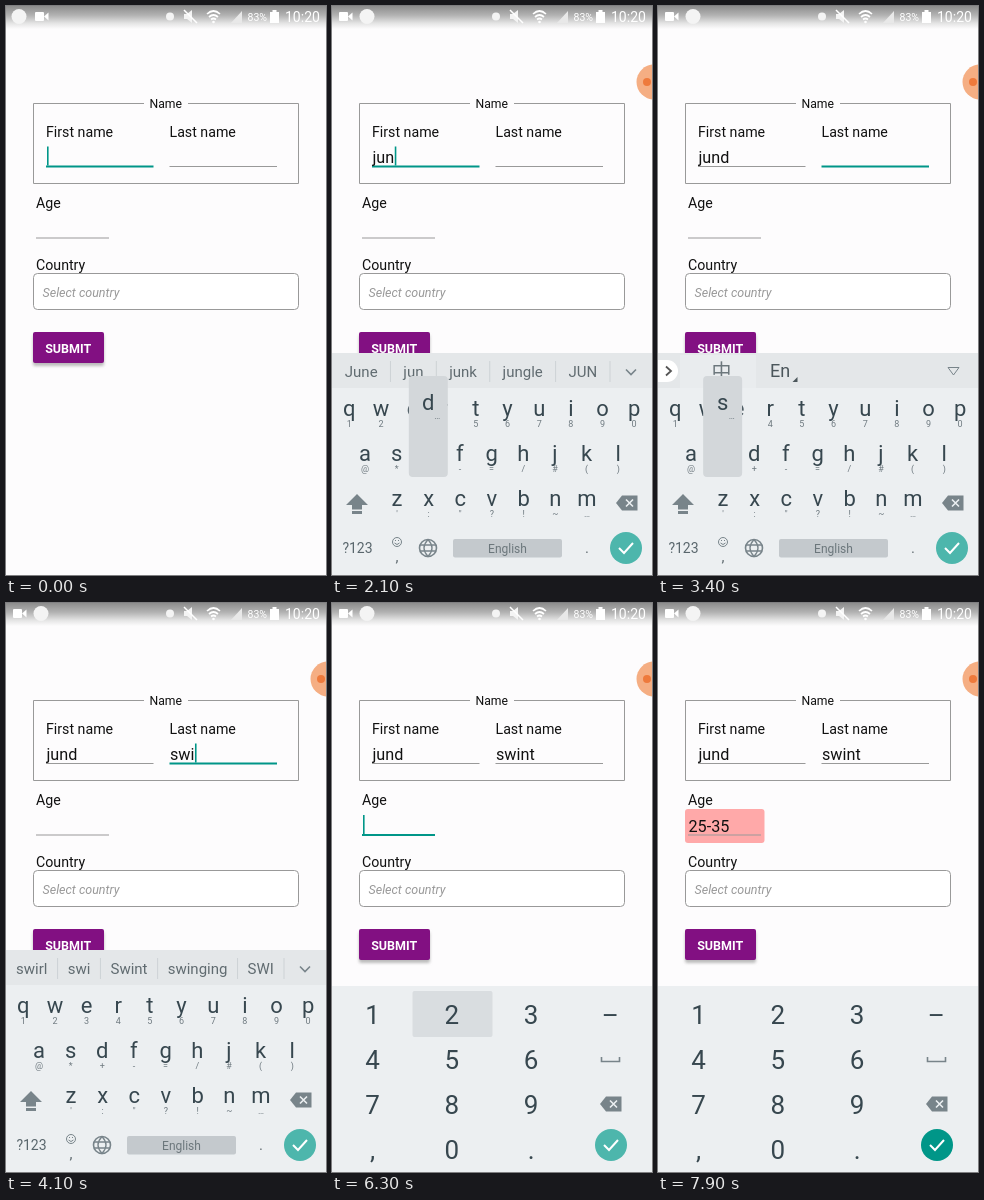
Recreate the animation shown at these times as an HTML page. Size 320x569 px, loop 8 s.

```html
<!DOCTYPE html>
<html lang="en">
<head>
<meta charset="utf-8">
<title>Form</title>
<style>
html, body { margin: 0; width: 100%; height: 100%; overflow: hidden; background: #fdfcfd; }
svg { display: block; width: 320px; height: 569px; font-family: Roboto, sans-serif; }
.mid { text-anchor: middle; }
.key { font-size: 22px; fill: #37474f; }
.num { font-size: 26px; fill: #37474f; }
.hint { font-size: 9px; fill: #6f7a80; }
.word { font-size: 15px; fill: #606b70; }
</style>
</head>
<body>
<svg id="stage" viewBox="0 0 320 569">
  <defs>
    <linearGradient id="bar" x2="0" y2="1">
      <stop offset="0" stop-color="#8c8c8c"/>
      <stop offset=".4" stop-color="#b2b2b2"/>
      <stop offset=".75" stop-color="#e4e4e4"/>
      <stop offset="1" stop-color="#fdfcfd"/>
    </linearGradient>
    <filter id="soft" x="-20%" y="-20%" width="140%" height="160%"><feGaussianBlur stdDeviation="1.6"/></filter>
  </defs>
</svg>
<script>
const LOOP = 8000, TEAL = '#009688', PALE = '#4db6ac', INK = '#37474f', GREY = '#78848a';
const stage = document.getElementById('stage');

function add(parent, tag, attrs, text) {
  const el = document.createElementNS('http://www.w3.org/2000/svg', tag);
  for (const k in attrs) el.setAttribute(k, attrs[k]);
  if (text !== undefined) el.textContent = text;
  parent.appendChild(el);
  return el;
}
const group = (p = stage) => add(p, 'g', {});
const rect = (p, x, y, width, height, fill, rx = 0) => add(p, 'rect', { x, y, width, height, fill, rx });
const dot = (p, cx, cy, r, fill) => add(p, 'circle', { cx, cy, r, fill });
const line = (p, d, stroke, width = 1) => add(p, 'path', { d, stroke, 'stroke-width': width, fill: 'none' });
const shape = (p, d, fill) => add(p, 'path', { d, fill });
const text = (p, x, y, str, size, fill = '#111', more = {}) => add(p, 'text', { x, y, 'font-size': size, fill, ...more }, str);
const label = (p, x, y, str, cls) => add(p, 'text', { x, y, class: 'mid ' + cls }, str);
const show = (el, on) => el.setAttribute('visibility', on ? 'visible' : 'hidden');

// Form
rect(stage, 0, 0, 320, 569, '#fdfcfd');
line(stage, 'M138 97.5H27.5V177.5H292.5V97.5H182', '#999');
text(stage, 143.5, 102, 'Name', 12.2);
text(stage, 40, 131, 'First name', 14.2);
text(stage, 163.5, 131, 'Last name', 14.2);
text(stage, 30, 202, 'Age', 14.2);
text(stage, 30, 263.5, 'Country', 14.2);
add(stage, 'rect', { x: 27.5, y: 267.5, width: 265, height: 36, rx: 4, fill: '#fff', stroke: '#999' });
text(stage, 36.5, 291, 'Select country', 12.5, '#999', { 'font-style': 'italic' });
rect(stage, 27, 329, 71, 31, '#bbb', 2).setAttribute('filter', 'url(#soft)');
rect(stage, 27, 326, 71, 31, '#821082', 2);
text(stage, 62.2, 346.5, 'SUBMIT', 12.5, '#fff', { class: 'mid', 'font-weight': 700 });
const error = rect(stage, 27, 206, 79.5, 34, '#ffa9a9', 3);

function makeField(x, width, base) {
  return {
    under: rect(stage, x, base + 2, width, 1, '#999'),
    value: text(stage, x + .5, base - 1.5, '', 16.2),
    caret: rect(stage, x + 1, base - 18, 1.6, 19, TEAL),
    x, base
  };
}
const fields = [makeField(40, 107.5, 158.5), makeField(163.5, 107.5, 158.5), makeField(30, 73, 230)];

// Status bar
rect(stage, 0, 0, 320, 23, 'url(#bar)');
const camera = group(), app = group();
rect(camera, -6, -4.5, 9, 9, '#fff', 1);
shape(camera, 'M3 0L7.5-4V4Z', '#fff');
dot(app, 0, 0, 7.5, '#f4f4f4');
dot(stage, 164, 10.5, 4, '#f4f4f4');
shape(stage, 'M178 8h3l5-4v13l-5-4h-3z', '#f4f4f4');
line(stage, 'M178 4l13 13', '#fff', 1.5);
line(stage, 'M201 8q6.500-6 13 0M203 11q4.500-4 9 0M205 13.500q2.500-2 5 0', '#fff', 1.7);
dot(stage, 207.500, 16, 1.3, '#fff');
shape(stage, 'M225 17h11V5z', '#e8e8e8');
text(stage, 241.5, 15, '83%', 10.5, '#fff');
shape(stage, 'M264 6h2.500V4h4v2h2.500v11h-9z', '#fff');
text(stage, 279, 15.5, '10:20', 14, '#fff');

// Floating bubble
const bubble = group();
dot(bubble, 322, 76, 17.5, '#f5ae83');
dot(bubble, 315, 76, 4, '#ee7a3c');

// Keyboards
function backspace(p, x, y) {
  shape(p, `M${x - 11} ${y}l6-7.500h15.500v15h-15.500z`, GREY);
  line(p, `M${x - 1} ${y - 3.5}l7 7m0-7l-7 7`, '#eceff1', 1.6);
}
function enter(p, x) {
  const disc = dot(p, x, 542, 16, PALE);
  line(p, `M${x - 7} 542l5 5 9-10`, '#fff', 2);
  return disc;
}

const abc = group();
rect(abc, 0, 347, 320, 222, '#eceff1');
rect(abc, 0, 347, 320, 35, '#e4e7e9');
const tools = group(abc), strip = group(abc);
rect(tools, 22, 349, 76, 33, '#e9ecee');
shape(tools, 'M0 354h9a11 11 0 0 1 0 22H0z', '#fff');
line(tools, 'M8 360.500l5 4.500-5 4.500', '#555', 1.8);
text(tools, 63.5, 372.5, '中', 20, '#6c777c', { class: 'mid', 'font-family': 'Noto Sans CJK SC, Noto Sans CJK, sans-serif' });
text(tools, 112, 371, 'En', 18, '#4b565b');
shape(tools, 'M134.500 376h5v-5z', '#4b565b');
line(tools, 'M290 361.500h11l-5.500 7.500z', GREY);

const keys = {};
const rows = [
  ['qwertyuiop', '1234567890', 17.3, 410, 421],
  ['asdfghjkl', '@*+-=/#()', 33, 455, 466],
  ['zxcvbnm', '\':"?!~…', 65, 500, 511]
];
for (const [letters, hints, x0, y, hy] of rows) {
  [...letters].forEach((ch, i) => {
    const x = x0 + 31.65 * i;
    label(abc, x, y, ch, 'key');
    label(abc, x, hy, hints[i], 'hint');
    keys[ch] = { x, y };
  });
}
shape(abc, 'M25 488l11 11h-6v4.500h-10V499h-6zM20 505h10v3h-10z', GREY);
backspace(abc, 295, 497);
text(abc, 25.5, 547, '?123', 14, '#59666c', { class: 'mid' });
add(abc, 'circle', { cx: 65, cy: 536, r: 4.5, fill: 'none', stroke: GREY });
line(abc, 'M62.500 537q2.500 3 5 0M63 534.500h1m2 0h1', GREY);
label(abc, 65, 556, ',', 'word');
add(abc, 'circle', { cx: 96, cy: 542, r: 8.5, fill: 'none', stroke: GREY, 'stroke-width': 1.6 });
line(abc, 'M88 539h16M88 545h16M96 533.500q-8 8.500 0 17q8-8.500 0-17', GREY, 1.3);
rect(abc, 121, 533, 109, 18.5, '#c4c9cd', 2);
text(abc, 175.5, 546.5, 'English', 12, '#6c777c', { class: 'mid' });
label(abc, 255, 547, '.', 'word');
const abcEnter = enter(abc, 294);
const popup = group(abc);
rect(popup, -19.5, -85, 39, 101, '#d3d7da', 4);
const popKey = label(popup, 0, -51, '', 'key');
label(popup, 9, -42, '…', 'hint');

const pad = group();
rect(pad, 0, 383, 320, 186, '#eceff1');
const cell = rect(pad, 0, 0, 80, 46, '#d9dde0', 2);
['123–', '456', '789', ',0.'].forEach((row, r) => [...row].forEach((ch, c) => {
  const x = 40.5 + 79.3 * c, y = 421 + 45 * r;
  label(pad, x, y, ch, 'num');
  keys[ch] = { x, y, pad: true };
}));
keys['-'] = keys['–'];
line(pad, 'M269.500 454v4.500h18V454', GREY, 1.6);
backspace(pad, 279, 501);
const padEnter = enter(pad, 279);

// Timeline: [field, key, down, up]
const taps = [
  [0, 'j', 1300, 1400], [0, 'u', 1600, 1700], [0, 'n', 1800, 1900], [0, 'd', 2100, 2200],
  [1, 's', 3400, 3500], [1, 'w', 3600, 3700], [1, 'i', 3900, 4000], [1, 'n', 4200, 4300], [1, 't', 4500, 4600],
  [2, '2', 6300, 6400], [2, '5', 6500, 6600], [2, '-', 6800, 6900], [2, '3', 7000, 7100], [2, '5', 7200, 7300]
];
const focuses = [[-200, 0], [2700, 1], [5300, 2], [7800, -1]];
const enters = [[2400, 2700], [5200, 5600], [7700, 8000]];
const slides = [[abc, 300, 2500], [abc, 2900, 5500], [pad, 5700, 9000]];
const ERROR_AT = 7800, BUBBLE_AT = 100;
const guesses = {
  j: 'just j join July J', ju: 'just ju jump July JU', jun: 'June jun junk jungle JUN', jund: 'Jund jund Jund\'s jungle',
  s: 'so s see some S', sw: 'sweet sw swim sweets SW', swi: 'swirl swi Swint swinging SWI',
  swin: 'swing swin Swint swings SWIN', swint: 'Swint swint Swint\'s smooth'
};

let stripWord = null;
function setStrip(word) {
  if (word === stripWord) return;
  stripWord = word;
  strip.replaceChildren();
  show(tools, !guesses[word]);
  if (!guesses[word]) return;
  const items = guesses[word].split(' ').map(w => label(strip, 0, 371, w, 'word'));
  const widths = items.map(el => el.getComputedTextLength());
  const gap = (278 - widths.reduce((a, b) => a + b, 0)) / items.length;
  let x = 0;
  items.forEach((el, i) => {
    const w = widths[i] + gap;
    el.setAttribute('x', x + w / 2);
    x += w;
    line(strip, `M${x} 355v21`, '#cdd2d5');
  });
  line(strip, 'M294 363.500l5 5 5-5', GREY, 1.6);
}

const clamp = v => Math.max(0, Math.min(1, v));

function moveBoards(t) {
  for (const board of [abc, pad]) {
    const run = slides.find(([b, from, to]) => b === board && t >= from && t < to + 200);
    show(board, run);
    board.style.display = run ? '' : 'none';
    if (!run) continue;
    const enterEase = 1 - (1 - clamp((t - run[1] + 50) / 250)) ** 3;
    const leaveEase = clamp((t - run[2] + 50) / 200) ** 2;
    const shown = enterEase * (1 - leaveEase);
    board.setAttribute('transform', `translate(0 ${(1 - shown) * 45})`);
    board.setAttribute('opacity', shown);
  }
}

function draw(t) {
  const [since, focus] = focuses.filter(f => f[0] <= t).pop();
  const typed = taps.filter(k => k[3] <= t);
  const word = i => typed.filter(k => k[0] === i).map(k => k[1]).join('');
  moveBoards(t);

  fields.forEach((f, i) => {
    const on = i === focus, str = word(i);
    if (f.value.textContent !== str) f.value.textContent = str;
    f.under.setAttribute('fill', on ? TEAL : '#999');
    f.under.setAttribute('y', on ? f.base + 1 : f.base + 1.5);
    f.under.setAttribute('height', on ? 2 : 1);
    const last = typed.filter(k => k[0] === i).pop();
    const start = last ? Math.max(last[3], since) : since;
    show(f.caret, on && Math.floor((t - start) / 500) % 2 === 0);
    f.caret.setAttribute('x', f.x + 1 + (str ? f.value.getComputedTextLength() : 0));
  });

  if (abc.style.display !== 'none') setStrip(t < 2800 ? word(0) : word(1));
  const tap = taps.find(k => t >= k[2] && t < k[3]);
  const key = tap && keys[tap[1]];
  popup.style.display = key && !key.pad ? '' : 'none';
  cell.style.display = key && key.pad ? '' : 'none';
  if (key && key.pad) {
    cell.setAttribute('x', key.x + .7 - 40);
    cell.setAttribute('y', key.y - 33);
  } else if (key) {
    popup.setAttribute('transform', `translate(${key.x} ${key.y})`);
    popKey.textContent = tap[1];
  }
  const pressed = enters.some(([a, b]) => t >= a && t < b);
  for (const disc of [abcEnter, padEnter]) disc.setAttribute('fill', pressed ? TEAL : PALE);

  const swapped = t >= BUBBLE_AT;
  camera.setAttribute('transform', `translate(${swapped ? 13 : 35} 10.5)`);
  app.setAttribute('transform', `translate(${swapped ? 35 : 13} 10.5)`);
  show(bubble, swapped);
  show(error, t >= ERROR_AT);
}

const began = performance.now();
function tick() {
  draw((performance.now() - began) % LOOP);
  requestAnimationFrame(tick);
}
tick();
</script>
</body>
</html>
```
